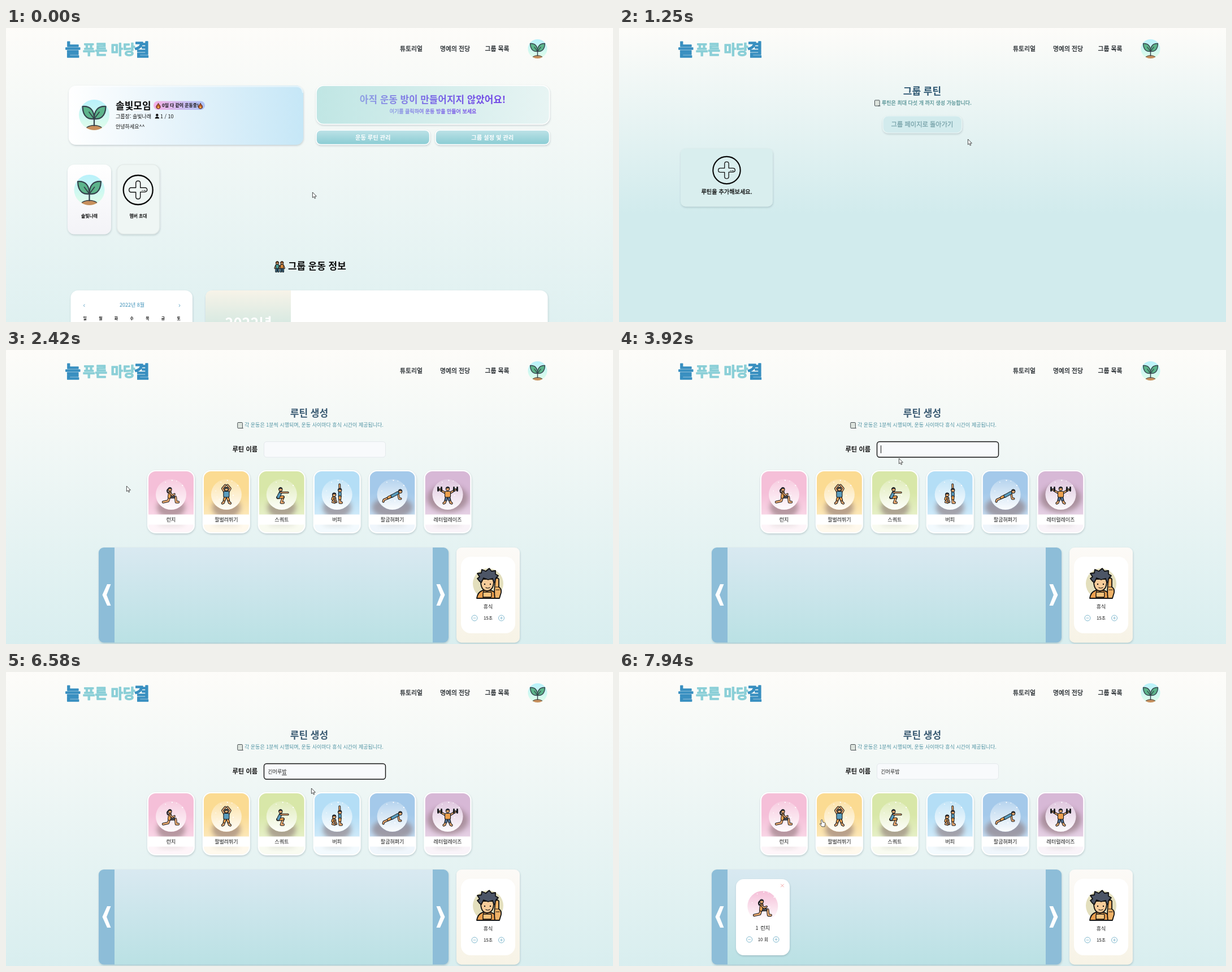
An HTML page for the animation above (8000 ms loop, 1074 by 521 pixels).

```html
<!DOCTYPE html>
<html lang="ko">
<head>
<meta charset="utf-8">
<title>Routine</title>
<style>
html, body { margin: 0; width: 100%; height: 100%; overflow: hidden; background: #fdfcf9; }
svg { display: block; width: 100%; height: 100%; }
text { font-family: "Noto Sans CJK KR", "Noto Sans KR", "Noto Sans CJK", "Noto Sans", sans-serif; white-space: pre; }
</style>
</head>
<body>
<svg id="stage" viewBox="0 0 1074 521" lang="ko"></svg>
<script>
const INK = '#20262b', SKIN = '#f0ad72', SHIRT = '#5a9cbd', ORANGE = '#eda04e';
const $ = id => document.getElementById(id);

// --- drawing helpers ---
const rect = (x, y, w, h, r, fill, more = '') =>
  `<rect x="${x}" y="${y}" width="${w}" height="${h}" rx="${r}" fill="${fill}" ${more}/>`;
const circle = (x, y, r, fill, more = '') =>
  `<circle cx="${x}" cy="${y}" r="${r}" fill="${fill}" ${more}/>`;
const ellipse = (x, y, rx, ry, fill, more = '') =>
  `<ellipse cx="${x}" cy="${y}" rx="${rx}" ry="${ry}" fill="${fill}" ${more}/>`;
const path = (d, fill, stroke = 'none', w = 1, more = '') =>
  `<path d="${d}" fill="${fill}" stroke="${stroke}" stroke-width="${w}" stroke-linecap="round" stroke-linejoin="round" ${more}/>`;
const at = (x, y, body, s = 1) => `<g transform="translate(${x} ${y}) scale(${s})">${body}</g>`;
const grad = (id, vertical, stops, more = '') =>
  `<linearGradient id="${id}" x2="${vertical ? 0 : 1}" y2="${vertical ? 1 : 0}" ${more}>` +
  stops.map(([c, o = 1], i) =>
    `<stop offset="${i / (stops.length - 1)}" stop-color="${c}" stop-opacity="${o}"/>`).join('') +
  '</linearGradient>';

// y is the middle of the line; weight 5 is a regular face thickened a little
function text(x, y, str, size, fill = INK, weight = 4, anchor = 'start') {
  const extra = weight === 5 ? .28 : weight === 9 ? 1.3 : 0;
  return `<text x="${x}" y="${y + size * .36}" font-size="${size}" fill="${fill}" ` +
    `font-weight="${weight > 5 ? 700 : 400}" text-anchor="${anchor}" ` +
    (extra ? `stroke="${fill}" stroke-width="${extra}" stroke-linejoin="round"` : '') + `>${str}</text>`;
}
const mid = (x, y, str, size, fill, weight) => text(x, y, str, size, fill, weight, 'middle');

const SHADOW = 'filter="url(#shadow)"';

// --- icons, centred on 0,0 ---
const leaf = path('M0 7 C-9 8 -20 5 -20.5 -15 C-6 -16 0 -7 0 7Z', '#5cb48b', '#35424c', 2.2) +
  path('M0 7 L-9 -5', 'none', '#35424c', 1.8);
const sprout = circle(0, 0, 27, 'url(#sky)') +
  path('M-14 23 Q-8 18 0 18 Q8 18 14 23 Q7 27 0 27 Q-7 27 -14 23Z', '#c78f5c') +
  path('M-13 22 Q-7 18.5 0 18.5 Q7 18.5 13 22', 'none', '#35424c', 1.4) +
  path('M0 6 V19', 'none', '#35424c', 2.2) + leaf + `<g transform="scale(-1 1)">${leaf}</g>`;

const plus = circle(0, 0, 26, 'none', 'stroke="#0a0a0a" stroke-width="2.3"') +
  path('M-4 -4 V-12 Q-4 -16 0 -16 Q4 -16 4 -12 V-4 H12 Q16 -4 16 0 Q16 3 12 3.6 H4 V12 Q4 16 0 16 Q-4 16 -4 12 V4 H-12 Q-16 4 -16 0 Q-16 -4 -12 -4Z',
    'none', '#111', 1.4) +
  path('M7 1 H8 M10 1 H13', 'none', '#111', 1.1);

const flame = path('M0 -4.5 C1 -2 3.7 -1 3.7 1.8 C3.7 4 2 5 0 5 C-2 5 -3.7 4 -3.7 1.8 C-3.7 -1 -1 -2 0 -4.5Z', '#b5562a', '#4b2b20', .9) +
  path('M0 0 Q2 2 1.6 4 H-1.6 Q-2 2 0 0Z', '#f3b04a');

const memo = rect(-4.5, -5, 8.5, 10, .8, '#e9efe8', 'stroke="#3c4448" stroke-width="1"') +
  path('M-2.5 -2.5 H2 M-2.5 0 H2 M-2.5 2.5 H1', 'none', '#b4bdb9', .6) + path('M2 5 L5 5', 'none', '#3c4448', 1.2);

const buddy = c => limb('M-1.5 3 L-2 9 M1.5 3 L2 9', '#3f7896', 1.7) + limb('M-2 -2 L-4 3 M2 -2 L4 3', SKIN, 1.3) +
  rect(-2.8, -3.5, 5.6, 7, 1.5, c, 'stroke="#111" stroke-width=".9"') +
  circle(0, -6.3, 2.7, SKIN, 'stroke="#111" stroke-width="1"') + path('M-2.6 -6.6 Q0 -11 2.6 -6.6Z', '#9a5a2c', '#111', .6);

function limb(d, color, w = 2.4) {
  return path(d, 'none', '#15181b', w + 2) + path(d, 'none', color, w);
}
const head = (x, y) => circle(x, y, 3.1, SKIN, 'stroke="#15181b" stroke-width="1.1"') +
  path(`M${x - 3.2} ${y - .4} Q${x - 2.5} ${y - 4.2} ${x + 1} ${y - 3.4} Q${x + 3.4} ${y - 2.8} ${x + 3} ${y - .8} Q${x} ${y - 2} ${x - 3.2} ${y - .4}Z`, '#2b2f36', '#15181b', .6);

const lunge = limb('M-3 5 L-5 11 L-14 13', SKIN) + limb('M-2 4 L8 4 L9 13 L13 13', SKIN) +
  limb('M-2 4 L5 4', '#4c4f58', 3) + limb('M-2 -4 L-3 4', ORANGE, 4) +
  limb('M-2 -3 L2 1 L6 -1', SKIN, 1.6) + path('M-5 -10 Q-8 -8 -6 -4', 'none', '#15181b', 2.2) + head(-2, -9.5);
const jack = limb('M-3 -4 L-7 -11 L-2 -17 M3 -4 L7 -11 L2 -17', SKIN, 1.9) +
  limb('M-2 4 L-5 14 L-7 15 M2 4 L5 14 L7 15', SKIN) + limb('M-2 4 L-3.5 9 M2 4 L3.5 9', ORANGE, 3) +
  rect(-5, -6, 10, 10.5, 2, SHIRT, 'stroke="#15181b" stroke-width="1.1"') + head(0, -10);
const squat = limb('M-7 5 L3 4 L-1 14 L3 14', SKIN) + limb('M-7 5 L2 4', ORANGE, 3.4) +
  limb('M-2 -4 L-6 4', SHIRT, 4) + limb('M-2 -4 L11 -4', SKIN, 1.7) + head(-2, -9.5);
const burpee = limb('M5 -4 L4.5 -18', SKIN, 1.9) + limb('M5 4 V14 L8 14', SKIN, 2.6) + limb('M5 -3 V3', SHIRT, 4) +
  limb('M5 4 V7', ORANGE, 3.4) + head(5, -8) +
  limb('M-8 6 L-3 6 L-8 13 L-4 14', SKIN, 1.7) + limb('M-6 3 L-8 8', ORANGE, 2.6) + limb('M-5 4 L-1 13', SKIN, 1.2) + head(-5, 0);
const pushup = limb('M10 -3 L12 7 L15 7', SKIN, 1.8) + limb('M-1 3 L-15 9 L-16 12', SKIN, 2.2) +
  limb('M-1 2 L-7 5', ORANGE, 3.2) + limb('M9 -3 L0 2', SHIRT, 4) + head(14, -6);
const raise = limb('M-4 -3 L-14 -9 M4 -3 L14 -9', SKIN, 1.9) + path('M-17 -10 H-10 M10 -10 H17', 'none', '#15181b', 1.6) +
  path('M-17 -13 V-7 M-11 -13 V-7 M11 -13 V-7 M17 -13 V-7', 'none', '#15181b', 2.8) +
  limb('M-2 4 L-5 14 L-7 15 M2 4 L5 14 L7 15', SKIN) + limb('M-2 4 L-3 9 M2 4 L3 9', '#53749a', 3) +
  rect(-5, -6, 10, 10.5, 2, ORANGE, 'stroke="#15181b" stroke-width="1.1"') + head(0, -10.5);

const resting = circle(0, 0, 27, '#e3dfbd') +
  path('M-20 26 Q-18 12 -4 11 Q14 11 18 26Z', ORANGE, '#111', 1.8) + path('M-8 13 L-9 26 M4 15 L4 26', 'none', '#111', 1.4) +
  rect(-9, 15, 15, 9, 1.5, '#f6c37c', 'stroke="#111" stroke-width="1.4"') +
  path('M-13 -8 Q-14 12 -2 13 Q11 12 10 -8Z', '#f7cc9a', '#111', 1.8) +
  path('M-15 -4 L-19 -9 L-15 -12 L-19 -18 L-12 -19 L-11 -25 L-4 -22 L2 -27 L6 -22 L13 -23 L13 -17 L18 -14 L14 -10 L15 -4 L10 -2 L8 -9 L0 -7 L-8 -10 L-12 -2Z', '#4c5566', '#111', 1.8) +
  circle(-6, 1, 1.2, '#111') + circle(4, 1, 1.2, '#111') + path('M-4 7 Q-1 9 3 7', 'none', '#111', 1.2) +
  path('M12 26 Q10 14 13 -8 Q16 -12 19 -8 L19 6 Q24 9 23 16 L20 26Z', '#f0b267', '#111', 1.8) + path('M13 6 H19 M14 11 H20', 'none', '#111', 1.2);

const stepper = (x, y, sign) => circle(x, y, 5, '#fff', 'stroke="#72b0c8" stroke-width=".9"') +
  path(`M${x - 2} ${y} H${x + 2}` + (sign ? ` M${x} ${y - 2} V${y + 2}` : ''), 'none', '#72b0c8', .8);

const dots = Array.from({ length: 12 }, (_, i) => {
  const a = i * 2.4, r = 12 + (i * 5) % 13;
  return circle((r * Math.cos(a)).toFixed(1), (r * Math.sin(a) - 3).toFixed(1), .5 + (i % 3) * .3, '#fff');
}).join('');

// --- scenes ---
const background = (id, end) =>
  grad(id, true, [['#fdfcf9'], ['#d1ebed']], `gradientUnits="userSpaceOnUse" x1="0" y1="0"`).replace('y2="1"', `y2="${end}"`) +
  rect(0, 0, 1074, 521, 0, `url(#${id})`);

const header = text(104.5, 38, '늘', 30, '#388fc0', 9) + text(136, 39, '푸른 마당', 23.4, '#8bcfd7', 9) +
  text(226.5, 38, '결', 30, '#388fc0', 9) +
  mid(717, 37.3, '튜토리얼', 10.9, INK, 5) + mid(794.5, 37.3, '명예의 전당', 10.9, INK, 5) +
  mid(869, 37.3, '그룹 목록', 10.9, INK, 5) + at(940.5, 37, sprout, .63);

const button = (x, w, label) => rect(x, 181, w, 25.5, 8, 'url(#btn)', `stroke="#fff" stroke-width="1.5" ${SHADOW}`) +
  (x < 600 ? rect(x, 181, w, 25.5, 8, 'url(#btnHot)', 'id="hot" stroke="#fff" stroke-width="1.5"') : '') +
  mid(x + w / 2, 194, label, 10.3, '#fff', 7);

const groupPage = background('bgA', 766) +
  rect(111, 102, 415, 105, 13, 'url(#panel)', SHADOW) +
  path('M125 103.5 H514 Q524 104 525 114', 'none', '#fff', 2, 'opacity=".55"') +
  at(156, 154, sprout) + text(194, 138, '솔빛모임', 17, '#0b0b0b', 7) +
  rect(261, 129.5, 91, 15.5, 7.7, 'url(#badge)') + at(269.5, 138, flame) + at(344, 138, flame) +
  text(276, 137.5, '0일 다 같이 운동중!', 7.9, '#111', 7) +
  text(194, 156.7, '그룹장: 솔빛나래', 9.02, '#111') +
  circle(267.3, 154.3, 2.2, '#111') + path('M263.5 160.5 Q264 157 267.3 157 Q270.8 157 271.2 160.5Z', '#111') +
  text(273, 156.7, '1 / 10', 9.02, '#111') + text(194, 174.7, '안녕하세요^^', 9.02, '#111') +
  rect(549, 102, 412.5, 68.5, 13, 'url(#banner)', `stroke="#fff" stroke-width="1.5" ${SHADOW}`) +
  mid(755, 127, '아직 운동 방이 만들어지지 않았어요!', 16.9, 'url(#violet)', 7) +
  mid(755.5, 147.7, '여기를 클릭하여 운동 방을 만들어 보세요', 9.02, 'url(#violet)', 5) +
  button(549, 200.5, '운동 루틴 관리') + button(760, 201.5, '그룹 설정 및 관리') +
  rect(109, 242, 77, 123.5, 12, 'url(#member)', SHADOW) + at(147.5, 287, sprout) +
  mid(147.5, 333, '솔빛나래', 7.9, '#111', 5) +
  rect(196.5, 242, 75, 123, 12, '#eff6f4', `stroke="#e2e9e7" stroke-width="1.2" ${SHADOW}`) + at(233.7, 287, plus) +
  mid(234, 333, '멤버 초대', 7.9, '#111', 5) +
  at(480, 422.5, buddy('#4d9d96')) + at(488.3, 422.5, buddy('#d98a3d')) +
  text(499, 421.7, '그룹 운동 정보', 16.9, '#0b0b0b', 7) +
  rect(114.5, 465, 215.5, 80, 13, '#fff', SHADOW) + mid(223, 491, '2022년 8월', 9.02, '#3a8fb8') +
  path('M139 489.8 L137.4 491.8 L139 493.8 M306.3 489.8 L307.9 491.8 L306.3 493.8', 'none', '#3a8fb8', .8) +
  [...'일월화수목금토'].map((d, i) => mid(139.7 + i * 27.65, 515, d, 6.8, '#111', 7)).join('') +
  rect(353, 465, 605.5, 80, 13, '#fff', SHADOW) +
  path('M504 465 V530 H353 V478 Q353 465 366 465Z', 'url(#date)') + text(387.5, 522.8, '2022년', 25.4, '#fff', 7);

const listPage = background('bgB', 330) +
  mid(536.5, 112, '그룹 루틴', 17, '#2f5873', 7) + at(457, 133, memo) +
  text(465, 133, '루틴은 최대 다섯 개 까지 생성 가능합니다.', 9.02, '#5c9799', 5) +
  rect(467, 156, 139.5, 30, 9, '#d2ebed', `stroke="#eaf6f6" stroke-width="1.2" ${SHADOW}`) +
  mid(536.5, 171, '그룹 페이지로 돌아가기', 11.28, '#78a3aa', 5) +
  `<g id="addCard">` + rect(109, 213.5, 163, 103, 9, '#d9eeee', SHADOW) + at(190.5, 252, plus, .93) +
  mid(190.5, 290.5, '루틴을 추가해보세요.', 10.2, '#0b0b0b', 5) + '</g>';

const moves = [
  ['런지', '#f5bfd8', lunge], ['팔벌려뛰기', '#fbdb92', jack], ['스쿼트', '#d8e7a8', squat],
  ['버피', '#b4def6', burpee], ['팔굽혀펴기', '#a4c9ea', pushup], ['레터럴레이즈', '#d7b8d6', raise]
];
const moveCard = ([name, tint, figure], i) => {
  const wide = i > 3 ? 36 : 25;
  return at(250 + i * 97.9, 213, rect(0, 0, 84, 112, 15, '#fff', SHADOW) + `<g clip-path="url(#card)">` +
    rect(2, 2, 80, 77, 0, tint) + rect(2, 40, 80, 39, 0, 'url(#fade)') +
    ellipse(42, i === 5 ? 50 : 66, wide, i === 5 ? 25 : 19, '#82696c', 'opacity=".55" filter="url(#blur)"') +
    circle(42, 43, 27, tint) + circle(42, 43, 27, 'url(#disc)') + at(42, 43, dots) + at(42, 43.5, figure) +
    rect(2, 79, 80, 31, 0, '#fff') + rect(2, 96, 80, 14, 0, tint, 'opacity=".16"') +
    ellipse(42, 96, 25, 4, '#776', 'opacity=".16" filter="url(#blur)"') + rect(2, 78.5, 80, 18, 0, '#fff') + '</g>' +
    mid(42, 88, name, 9.02, '#161616'));
};
const arrow = path('M9 0 H15.5 L8 19 L15.5 38 H9 L.5 19Z', '#fff');

const createPage = background('bgC', 630) +
  mid(536.5, 112, '루틴 생성', 17, '#3b5b73', 7) + at(414.3, 133.5, memo) +
  text(422, 133, '각 운동은 1분씩 시행되며, 운동 사이마다 휴식 시간이 제공됩니다.', 9.02, '#4f93a3') +
  text(400.5, 176, '루틴 이름', 11.28, '#111', 7) +
  rect(456.5, 162.5, 215, 27.5, 4.5, '#f8fafc', 'id="field"') +
  '<text id="typed" x="463.3" y="180" font-size="9.02" fill="#222"></text>' +
  path('M488.5 182.5 H496.2', 'none', '#222', .9, 'id="underline"') + path('M0 169.5 V182.5', 'none', '#111', 1, 'id="caret"') +
  moves.map(moveCard).join('') +
  rect(164, 350, 619, 168.5, 9, '#8dbdd8', SHADOW) + rect(192, 350, 563, 168.5, 0, 'url(#track)') +
  at(170, 415, arrow) + `<g transform="translate(777 415) scale(-1 1)">${arrow}</g>` +
  rect(797, 350, 112, 168.5, 9, 'url(#cream)', SHADOW) + rect(805, 366.5, 96, 135.5, 17, '#fff') +
  at(853, 414, resting) + mid(853, 454.7, '휴식', 9.02, '#161616') +
  stepper(829, 475, 0) + mid(853, 475, '15초', 7.9, '#161616') + stepper(876.5, 475, 1) +
  '<g id="picked">' + rect(207, 367, 95, 135, 14, '#fff', SHADOW) +
  path('M286.5 376 L291.5 381 M291.5 376 L286.5 381', 'none', '#f2a5a5', 1) +
  circle(254.3, 415, 27, 'url(#pink)') + at(254.3, 415, dots) + at(254.5, 417, lunge, 1.08) +
  mid(244, 454, '1', 9.02, '#161616') + text(250.5, 454, '런지', 9.02, '#161616') +
  stepper(230.7, 474, 0) + mid(254.8, 474, '10 회', 7.9, '#161616') + stepper(278, 474, 1) + '</g>';

$('stage').innerHTML = '<defs>' +
  grad('sky', true, [['#b9f1fb'], ['#ccf8f2'], ['#e2fde9']]) + grad('panel', false, [['#fff'], ['#e3f2fa'], ['#c6e7f7']]) +
  grad('badge', false, [['#f5b1e6'], ['#abc3f5']]) + grad('banner', false, [['#c0e6e4'], ['#e7f4f3']]) +
  grad('violet', false, [['#8fa0e3'], ['#7a68e6'], ['#7044e6']]) + grad('btn', true, [['#bde2e7'], ['#8accd3']]) +
  grad('btnHot', true, [['#a3d2d6'], ['#699da2']]) + grad('member', true, [['#fff'], ['#f3f3f7']]) +
  grad('date', true, [['#f7f3e8'], ['#d4e8e1']]) + grad('fade', true, [['#fff', 0], ['#fff', .35]]) +
  grad('disc', true, [['#fff', .2], ['#fff', .95]]) + grad('track', true, [['#d9e9f1'], ['#bae1e4']]) +
  grad('cream', true, [['#fcfaf7'], ['#f7f3e6']]) + grad('pink', true, [['#f5bfd8'], ['#fff']]) +
  '<filter id="shadow" x="-10%" y="-10%" width="120%" height="130%"><feDropShadow dx=".5" dy="1.6" stdDeviation="1.5" flood-color="#345" flood-opacity=".24"/></filter>' +
  '<filter id="blur" x="-40%" y="-60%" width="180%" height="220%"><feGaussianBlur stdDeviation="4"/></filter>' +
  `<clipPath id="card">${rect(2, 2, 80, 108, 13, '#000')}</clipPath></defs>` +
  `<g id="page0">${groupPage}</g><g id="page1">${listPage}</g><g id="page2">${createPage}</g>${header}` +
  '<g id="cursor">' + circle(-.5, .5, 6.5, '#c5d63e', 'id="click" opacity=".8"') +
  path('M.4 .4 V9.7 L2.6 7.8 L4.2 11.2 L5.7 10.5 L4.2 7.2 H7Z', '#fff', '#222', .8, 'id="arrow"') +
  path('M1 0 Q2 -1 2.8 .2 L3.6 4.2 L6.6 4.8 Q8 5.2 7.8 7 L7 12 H1.8 L-1.6 7.5 Q-1.6 6 0 6.8 L1.2 8 L.5 .8Z', '#fff', '#222', .8, 'id="hand"') +
  path('M-2 -5 H2 M0 -5 V5 M-2 5 H2', 'none', '#222', .9, 'id="beam"') + '</g>';

// --- motion ---
const LOOP = 8000;
const track = [
  [70, 542, 291], [1000, 617, 197], [1510, 617, 197], [2140, 213, 241], [2550, 213, 241], [3100, 287, 232],
  [3170, 287, 232], [3640, 488, 175], [3800, 492, 180], [3920, 495, 192], [3990, 495, 192], [4250, 540, 206],
  [6910, 540, 206], [7540, 288, 258], [7720, 288, 258], [7940, 357, 262]
];
const typing = [
  [4520, 'ㄱ'], [4650, '기'], [4780, '긴'], [4910, '긴ㅁ'], [5310, '긴머'], [5440, '긴멀'],
  [5640, '긴머루'], [5840, '긴머룹'], [5980, '긴머루바'], [6050, '긴머루밤']
];
const clicks = [[1110, 1250], [2350, 2420], [3720, 3800], [7610, 7740]];

const clamp = v => Math.max(0, Math.min(1, v));
const within = (t, a, b) => t >= a && t < b;
const show = (id, on) => $(id).setAttribute('display', on ? 'inline' : 'none');

function pointer(t) {
  const i = track.findIndex(k => k[0] > t);
  if (i < 1) return (i ? track[track.length - 1] : track[0]).slice(1);
  const [t0, x0, y0] = track[i - 1], [t1, x1, y1] = track[i];
  const p = (t - t0) / (t1 - t0), e = p * p * (3 - 2 * p);
  return [x0 + (x1 - x0) * e, y0 + (y1 - y0) * e];
}

function draw(t) {
  const page = t < 1250 ? 0 : t < 2420 ? 1 : 2;
  for (let i = 0; i < 3; i++) show('page' + i, i === page);

  $('hot').setAttribute('opacity', clamp((t - 840) / 150));
  const grow = 1 + .07 * clamp((t - 1980) / 150);
  $('addCard').setAttribute('transform', `translate(190.5 265) scale(${grow}) translate(-190.5 -265)`);

  const focus = within(t, 3780, 7610);
  $('field').setAttribute('stroke', focus ? '#111' : '#e4e9ec');
  $('field').setAttribute('stroke-width', focus ? 1.4 : 1);
  const word = typing.reduce((s, [at, str]) => t >= at ? str : s, '');
  const end = 463.3 + word.length * 8.3;
  $('typed').textContent = word;
  show('underline', focus && word);
  $('underline').setAttribute('transform', `translate(${end - 496.5} 0)`);
  show('caret', within(t, 3780, 4190) || within(t, 4520, 6580));
  $('caret').setAttribute('transform', `translate(${word ? end : 463.5} 0)`);
  show('picked', t >= 7740);

  const [x, y] = pointer(t);
  const onField = page === 2 && within(x, 456, 672) && within(y, 162, 190);
  const onCard = page === 2 && within(y, 213, 325) && within(x, 250, 823) && (x - 250) % 97.9 < 84;
  $('cursor').setAttribute('transform', `translate(${x} ${y})`);
  show('arrow', !onField && !onCard);
  show('hand', onCard);
  show('beam', onField);
  show('click', clicks.some(([a, b]) => within(t, a, b)));
}

const start = performance.now();
function tick() {
  draw((performance.now() - start) % LOOP);
  requestAnimationFrame(tick);
}
tick();
</script>
</body>
</html>
```
